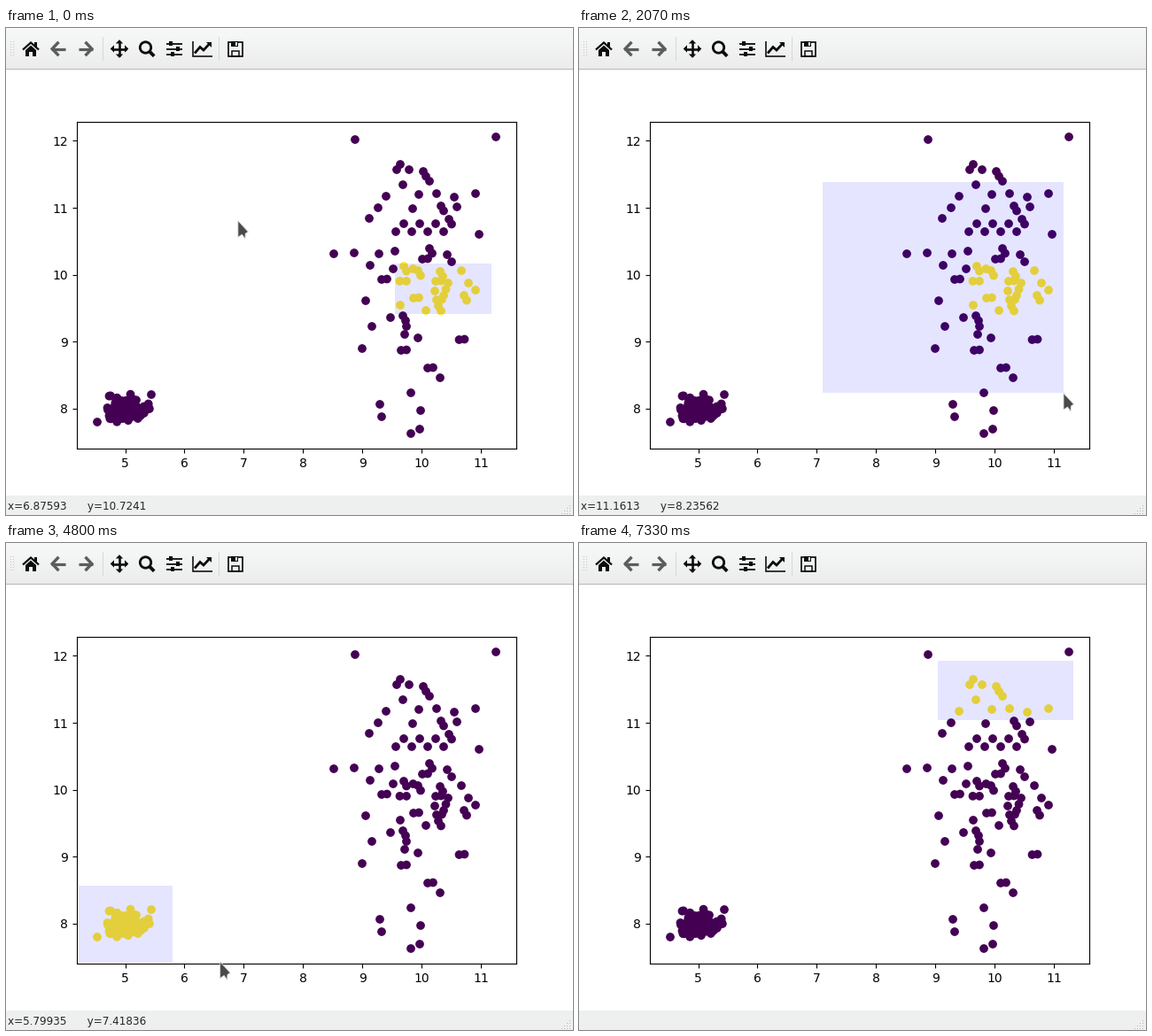
These frames come from a looping animation (640x550 px, 8000 ms). A matplotlib script:

```python
import numpy as np
import matplotlib.pyplot as plt
from matplotlib.animation import FuncAnimation
from matplotlib.patches import Circle, Polygon, Rectangle

W, H = 640, 550
LOOP, INTERVAL, TICKS = 8000, 40, 120
TICK = LOOP / TICKS
PX = 0.72  # points per pixel at 100 dpi

LEFT, BOTTOM, AX_W, AX_H = 80, 475.2, 496, 369.6
X0, Y0, X_SCALE, Y_SCALE = 4.185, 7.4025, 66.9, 75.65

INK, DIM, BAR = "#0c0c0c", "#5b5d5c", "#eef0ef"
PURPLE, YELLOW = "#440154", "#fde725"

# Scatter in stage pixels: lone dots, and dots with a close neighbour
LONE = [
    (394, 126), (553, 123), (441, 160), (445, 154), (455, 160), (478, 173),
    (448, 177), (429, 190), (466, 188), (486, 187), (506, 191), (530, 187),
    (420, 203), (410, 215), (459, 204), (509, 202), (534, 233), (370, 255),
    (393, 254), (421, 255), (439, 252), (498, 256), (503, 264), (411, 268),
    (514, 274), (522, 288), (530, 296), (484, 297), (406, 308), (445, 313),
    (474, 319), (434, 327), (413, 337), (452, 337), (450, 346), (465, 350),
    (402, 362), (490, 395), (457, 412), (422, 425), (424, 439), (468, 432),
    (467, 453), (457, 458), (103, 445), (164, 414),
]
TWIN_BELOW = [(471, 162), (491, 201), (500, 216), (478, 249), (449, 269),
              (465, 274), (490, 275), (517, 302), (448, 325), (488, 314)]
TWIN_BESIDE = [(424, 284), (485, 286), (470, 261), (460, 305), (486, 307),
               (511.5, 352), (446, 364), (476, 384)]

# Pointer legs: start, end, x, y, ease-out power
ORIGIN = (260, 224)
LEGS = [
    (-67, 467, 275, 174, 1), (600, 1467, 524, 386, 2),
    (1467, 2067, 547, 412.5, 2), (2333, 3200, 81.5, 387, 2),
    (3867, 4467, 188, 474, 2), (4740, 5200, 596, 466, 1),
    (5200, 5600, 516, 448, 2), (5600, 6200, 397, 333, 1),
    (6200, 6466, 558, 199.5, 2), (6534, 6740, 405, 133, 1),
    (7001, 7267, 602, 182, 1),
]
DRAGS = [(667, 2133), (3867, 4800), (5733, 6267), (6600, 7067)]  # press, release
FIRST_BOX = (439, 266, 548, 323)
EXIT = 7330


def make_points():
    below, beside = np.array(TWIN_BELOW), np.array(TWIN_BESIDE)
    k = np.arange(7)
    zigzag = np.column_stack([440 + 9 * k, 230 - 9 * (k % 2)])
    k = np.arange(4)
    arch = np.column_stack([437 + 7.5 * k, 272 + 16 * np.sin(np.pi * k / 3)])
    run = np.linspace((499, 288), (494, 302), 3)
    rng = np.random.default_rng(4)
    blob = rng.normal((135, 429), (12.5, 9), (200, 2))
    inside = (((blob - (135, 429)) / (28, 19)) ** 2).sum(axis=1) < 1
    return np.vstack([LONE, below, below + (3, 5.5), beside, beside + (6, -0.5),
                      zigzag, arch, run, blob[inside][:98]])


def pointer(t):
    pos = here = np.array(ORIGIN, float)
    for start, end, x, y, power in LEGS:
        u = np.clip((t - start) / (end - start), 0, 1)
        step = np.array((x, y)) - here
        pos = pos + step * (1 - (1 - u) ** power)
        here = here + step
    return pos


def drag_box(drag, t):
    """Box of a drag; its free corner trails the pointer by one tick."""
    press, release = drag
    a = pointer(press - 2 * TICK)
    b = pointer(min(t, release) - TICK)
    return (*np.minimum(a, b), *np.maximum(a, b))


def contains(bounds, pts):
    x, y = pts.T
    left, top, right, bottom = bounds
    return (x >= left) & (x <= right) & (y >= top) & (y <= bottom)


fig = plt.figure(figsize=(W / 100, H / 100), dpi=100, facecolor="white")

plot = fig.add_axes([LEFT / W, 1 - BOTTOM / H, AX_W / W, AX_H / H])
plot.set(xlim=(X0, X0 + AX_W / X_SCALE), ylim=(Y0, Y0 + AX_H / Y_SCALE),
         xticks=range(5, 12), yticks=range(8, 13))

stage = fig.add_axes([0, 0, 1, 1])
stage.axis("off")


def fill(points, color=INK, **kw):
    return stage.add_patch(Polygon(points, closed=True, fc=color,
                                   **{"ec": "none", **kw}))


def box(x, y, w, h, color=INK, **kw):
    return stage.add_patch(Rectangle((x, y), w, h, **{"fc": color, "ec": "none", **kw}))


def stroke(xs, ys, width, color=INK):
    stage.plot(xs, ys, color=color, lw=width * PX, solid_capstyle="butt",
               solid_joinstyle="miter")


def draw_home():
    stroke((19, 28, 37), (24.5, 16.5, 24.5), 2.2)
    box(32, 16, 2.6, 5)
    fill([(22, 25), (28, 19.7), (34, 25), (34, 32), (22, 32)])
    box(26, 27, 4, 5.2, BAR)


def draw_arrow(x, sign):
    y = 23.5
    stroke((x, x + sign * 16), (y, y), 3.2, DIM)
    tail = x + sign * 8.5
    stroke((tail, x + sign * 1.2, tail), (y - 7.7, y, y + 7.7), 3.4, DIM)


def draw_move(cx, cy):
    stroke((cx - 8, cx + 8), (cy, cy), 2.6)
    stroke((cx, cx), (cy - 8, cy + 8), 2.6)
    head = np.array([(10.3, 0), (6, -4.2), (6, 4.2)])
    for c, s in ((1, 0), (0, 1), (-1, 0), (0, -1)):
        fill(head @ np.array([(c, s), (-s, c)]) + (cx, cy))


def draw_zoom():
    stage.add_patch(Circle((157.5, 22), 6.2, fc="none", ec=INK, lw=2.8 * PX))
    stroke((161.8, 167.2), (26.3, 31.8), 3.8)


def draw_sliders():
    for row, knob in enumerate((186, 194, 188)):
        y = 17.5 + 6 * row
        stroke((181, 199), (y, y), 1.8)
        box(knob - 2, y - 2.4, 4, 4.8)


def draw_chart():
    stroke((211, 211, 232.5), (14.5, 32, 32), 1.6)
    stroke((213, 219, 223, 229.5), (28.5, 21.5, 25, 18), 2.8)
    fill([(225.5, 15.5), (231.5, 15.5), (231.5, 21.5)])


def draw_floppy():
    box(251, 15.5, 15.7, 16, "none", ec=INK, lw=1.7 * PX)
    box(254, 15, 8, 6)
    box(258.5, 16.3, 2, 3.4, "white")
    box(254.5, 26, 8.8, 5.5, "none", ec=INK, lw=1.5 * PX)


def draw_window():
    shade = np.linspace(0xF8, 0xEC, 46)[:, None, None] / 255
    stage.imshow(shade * np.array([0.997, 1.003, 1]), extent=(0, W, 46, 0),
                 aspect="auto", zorder=0)
    box(0, 46, W, 1, "#b6b9b8")
    box(0, 528, W, 22, BAR)
    for x in (109, 240):
        box(x, 10, 1, 27, "#d6d9d8")
    for i in range(6):
        for x in (5, 8):
            box(x, 15 + 3 * i, 1, 1, "#c3c6c5")
    for row in range(4):
        for col in range(row + 1):
            box(636 - 3 * col, 539 + 3 * row, 1.2, 1.2, "#b4b7b6")
    draw_home()
    draw_arrow(51, 1)
    draw_arrow(98, -1)
    draw_move(128, 23.5)
    draw_zoom()
    draw_sliders()
    draw_chart()
    draw_floppy()


draw_window()
points = make_points()
dots = stage.scatter(*points.T, s=36, zorder=3)
selector = box(0, 0, 0, 0, "blue", alpha=0.1, zorder=4)
ARROW = np.array([(0, 0), (0, 18.5), (4.5, 15.5), (8, 20.5), (8.3, 14.5),
                  (11.5, 12.5)])
cursor = fill(ARROW, "#4a4a4a", ec="#d8d8d8", lw=0.8 * PX, zorder=6)
status = stage.text(2, 544, "", fontsize=12 * PX, color="#232627",
                    va="baseline")
stage.set(xlim=(0, W), ylim=(H, 0))


def status_text(x, y):
    if not LEFT <= x <= LEFT + AX_W:
        return ""
    data_x = X0 + (x - LEFT) / X_SCALE
    data_y = Y0 + (BOTTOM - y) / Y_SCALE
    return f"x={data_x:.6g}      y={data_y:.6g}"


def update(i):
    tick = (INTERVAL * i + INTERVAL - 1) * TICKS // LOOP
    t = tick * TICK + 0.5

    shown = picked = FIRST_BOX
    for drag in DRAGS:
        if t >= drag[0]:
            shown = drag_box(drag, t)
        if t >= drag[1]:
            picked = drag_box(drag, t)

    dots.set_color(np.where(contains(picked, points), YELLOW, PURPLE))
    left, top, right, bottom = shown
    selector.set_bounds(left, top, right - left, bottom - top)
    cursor.set_xy(ARROW + pointer(t))
    cursor.set_visible(t < EXIT)
    status.set_text(status_text(*pointer(t - TICK)) if t < EXIT else "")
    return dots, selector, cursor, status


anim = FuncAnimation(fig, update, frames=LOOP // INTERVAL, interval=INTERVAL,
                     repeat=True, repeat_delay=0, blit=False)
plt.show()
```
